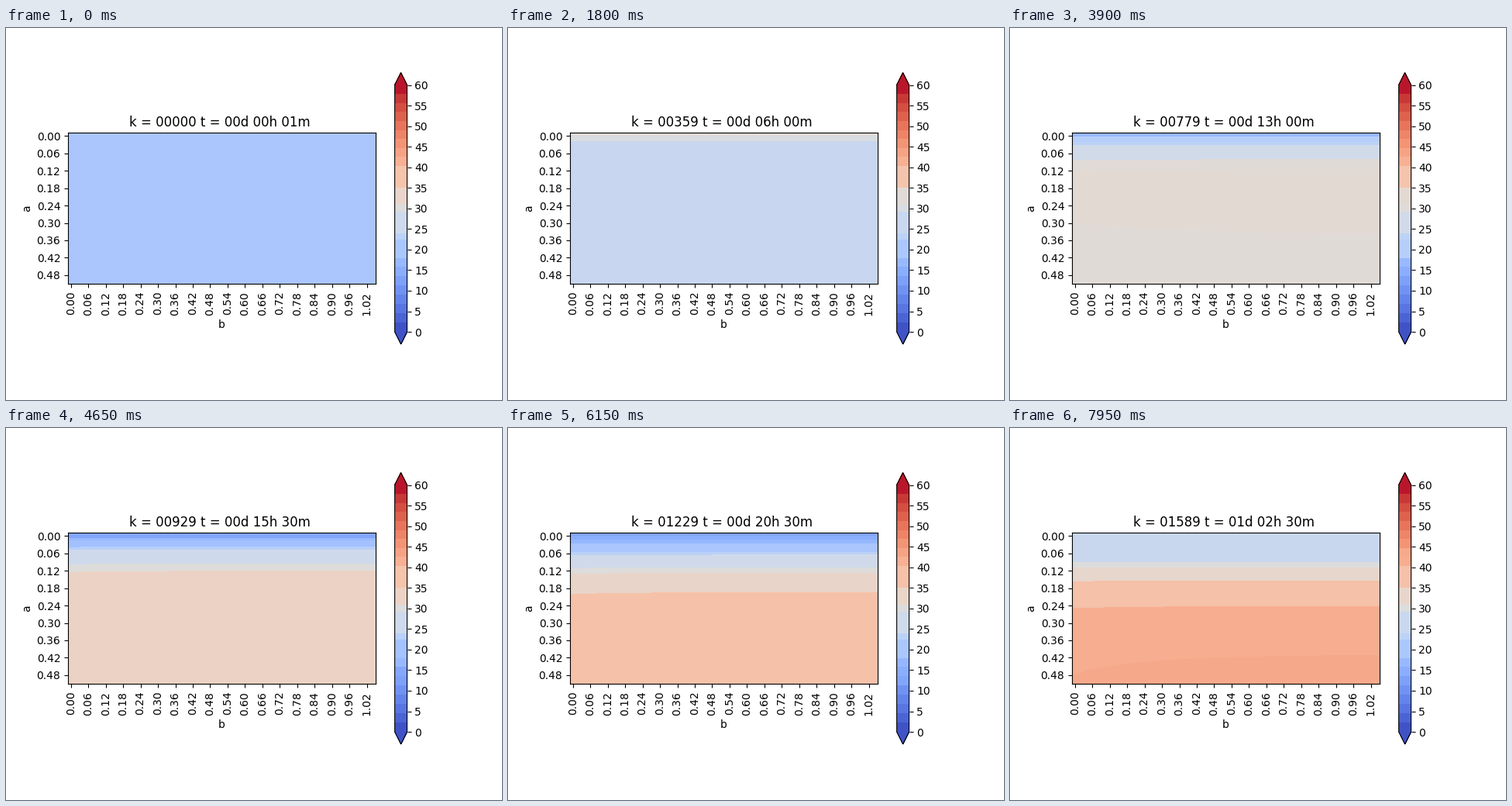
Write a matplotlib script that moves like this. It is 640 px wide and 480 px high and loops after 8000 ms.

```python
import numpy as np
import matplotlib.pyplot as plt
from matplotlib.animation import FuncAnimation
from matplotlib.colors import ListedColormap

ROWS, COLS, CELL = 26, 53, 0.02
STEP_MS, INTERVAL, LOOP_MS = 150, 50, 8000

# Bulk and surface temperature at a few times, counted in half hours
KEY_STEPS = [0, 12, 20, 26, 36, 45, 53]
BULK = [20, 25.3, 27.5, 30.8, 37, 40, 42.3]
SURFACE = [20, 31, 23.5, 17, 10, 16, 24.3]

# Colour bands: even at both ends of the scale, uneven in the middle
EDGES = np.r_[np.linspace(0, 18, 9), 22.5, 24, 29.2, 30.9, 35,
              np.linspace(40.3, 60, 10)]
BAND_CENTRES = (EDGES[:-1] + EDGES[1:]) / 2
LEVELS = (np.arange(1200) + 0.5) / 20


def band_of(values):
    return np.searchsorted(EDGES, values, side="right") - 1


def field(step):
    row, col = np.arange(ROWS)[:, None], np.arange(COLS)
    bulk = np.interp(step, KEY_STEPS, BULK)
    surface = np.interp(step, KEY_STEPS, SURFACE)

    # The warm pulse of the first day sinks and fades
    strength = 2.2 * min(max(step - 12, 0) / 8, np.exp((20 - step) / 22))
    centre = 5 + 0.6 * (step - 20)
    inner = bulk + strength * np.exp(-((row - centre) / 5) ** 2)

    # The surface layer thickens and rounds off with time
    depth = 0.9 + 0.22 * abs(step - 20)
    power = 1 + (max(step - 36, 0) / 17) ** 1.5
    layer = np.exp(-(row / depth) ** power)

    edge_loss = 0.015 * (bulk - surface) * np.exp(-col / 14.7)
    return inner + (surface - inner) * layer - edge_loss * (1 - layer)


def banded_cmap(data):
    """Paint each band in the mean colour of the cells that fall in it."""
    bands = band_of(data.ravel())
    counts = np.bincount(bands, minlength=len(BAND_CENTRES))
    sums = np.bincount(bands, data.ravel(), minlength=len(BAND_CENTRES))
    values = np.where(counts > 0, sums / np.maximum(counts, 1), BAND_CENTRES)
    return ListedColormap(plt.cm.coolwarm(values / 60)[band_of(LEVELS)])


def title(step):
    k = max(30 * step - 1, 0)
    hours, minutes = divmod(max(30 * step, 1), 60)
    days, hours = divmod(hours, 24)
    return f"k = {k:05d} t = {days:02d}d {hours:02d}h {minutes:02d}m "


def label_ticks(set_ticks, count, **style):
    ticks = range(0, count, 3)
    set_ticks(ticks, [f"{i * CELL:.2f}" for i in ticks], **style)


fig, ax = plt.subplots(figsize=(6.4, 4.8), dpi=100)
fig.subplots_adjust(left=0.125, right=0.9, bottom=0.15, top=0.88)
image = ax.imshow(field(0), vmin=0, vmax=60, cmap=banded_cmap(field(0)),
                  interpolation="bilinear")
fig.colorbar(image, ax=ax, extend="both", aspect=22, ticks=range(0, 61, 5))
label_ticks(ax.set_xticks, COLS, rotation=90)
label_ticks(ax.set_yticks, ROWS)
ax.set_xlabel("b")
ax.set_ylabel("a")


def update(frame):
    step = frame * INTERVAL // STEP_MS
    data = field(step)
    image.set_data(data)
    image.set_cmap(banded_cmap(data))
    ax.set_title(title(step))
    return image, ax.title


anim = FuncAnimation(fig, update, frames=LOOP_MS // INTERVAL,
                     interval=INTERVAL, repeat=True, repeat_delay=0)
plt.show()
```
